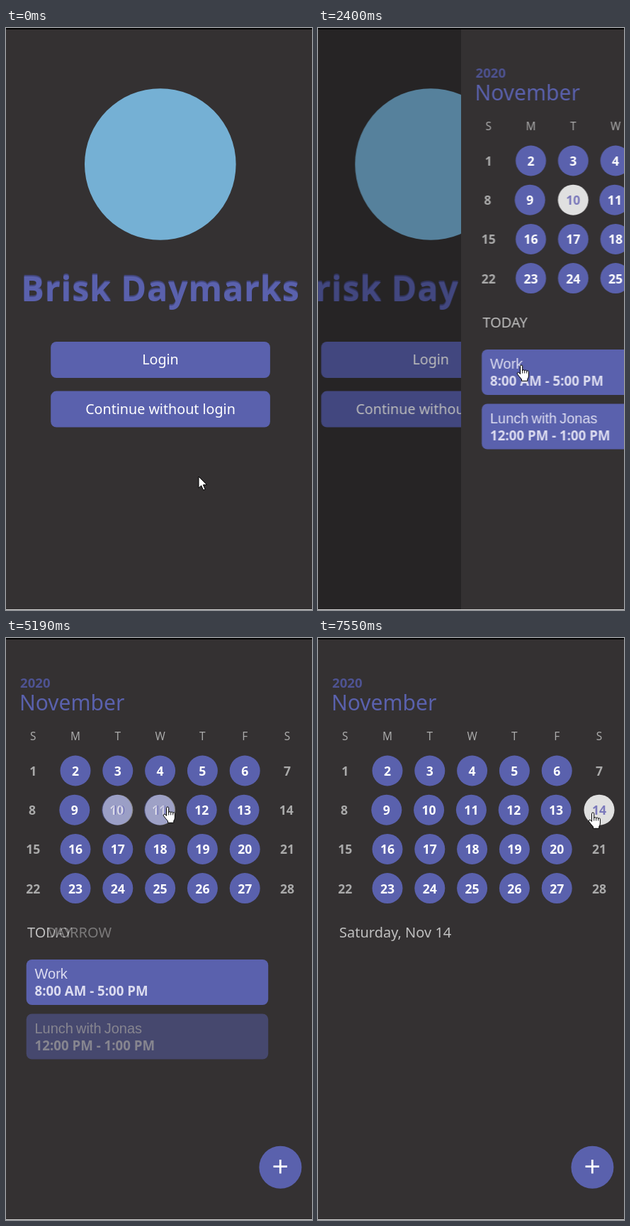
Animation of 432 by 820 pixels, one loop 8000 ms. Source, as an HTML page:

```html
<!DOCTYPE html>
<html lang="en">
<head>
<meta charset="utf-8">
<title>Calendar app</title>
<style>
  html, body { margin: 0; width: 100%; height: 100%; overflow: hidden; background: #343132; }
  svg { display: block; width: 432px; height: 820px; font-family: "Noto Sans", "Open Sans", sans-serif; }
  .bg { fill: #343132; }
  .blue { fill: #5a61ad; }
  .white { fill: #fff; }
  .grey { fill: #aaa; }
  .mid { text-anchor: middle; }
  .title { font-size: 48.5px; font-weight: 600; letter-spacing: .8px; text-shadow: 0 -2px 1px #454a85; }
  .button { font-size: 19.7px; }
  .year { font-size: 18.6px; font-weight: 700; fill: #4e5392; }
  .month { font-size: 30px; }
  .week { font-size: 15.4px; }
  .day { font-size: 17.6px; font-weight: 600; }
  .picked { fill: #7b79bb; }
  .heading { font-size: 20px; fill: #c0c0c0; }
  .event { font: 20px "Liberation Sans", Arial, sans-serif; word-spacing: -1.5px; fill: #dcdcf0; }
  .time { font-size: 18.7px; font-weight: 600; fill: #dcdcf0; }

  .anim { animation: 8s linear infinite both; }
  #login { animation-name: leave; }
  #shade { animation-name: dim; }
  #month { animation-name: enter; }
  #tomorrow { animation-name: fade1; }
  #saturday { animation-name: fade2; }
  #cursor { animation-name: move; }
  #arrow { animation-name: arrow; animation-timing-function: step-end; }
  #hand { animation-name: hand; animation-timing-function: step-end; }

  @keyframes leave {
    0%, 27.4% { transform: translateX(0); animation-timing-function: cubic-bezier(.66,.1,.66,.9); }
    31.5%, 100% { transform: translateX(-110.5px); }
  }
  @keyframes enter {
    0%, 27.4% { transform: translateX(432px); animation-timing-function: cubic-bezier(.66,.1,.66,.9); }
    31.5%, 100% { transform: translateX(0); }
  }
  @keyframes dim {
    0%, 27.4% { opacity: 0; animation-timing-function: cubic-bezier(.66,.1,.66,.9); }
    31.5%, 100% { opacity: .5; }
  }
  @keyframes fade1 {
    0%, 62.125% { opacity: 0; animation-timing-function: cubic-bezier(.8,.1,.7,.9); }
    66.125%, 100% { opacity: 1; }
  }
  @keyframes fade2 {
    0%, 90% { opacity: 0; animation-timing-function: cubic-bezier(.8,.1,.7,.9); }
    94.375%, 100% { opacity: 1; }
  }
  @keyframes move {
    0%, 12.1% { transform: translate(272px, 632px); }
    13.5% { transform: translate(250px, 604px); }
    15% { transform: translate(232px, 570px); }
    16.25% { transform: translate(232px, 540px); }
    18.75% { transform: translate(262px, 495px); }
    21.25%, 22.3% { transform: translate(283px, 476px); }
    23.125%, 44.99% { transform: translate(287px, 475px); }
    45%, 46.1% { transform: translate(282px, 471px); }
    50% { transform: translate(225px, 320px); }
    52.5% { transform: translate(199px, 250px); }
    53.75% { transform: translate(206px, 223px); }
    55% { transform: translate(226px, 236px); }
    55.375%, 78.12% { transform: translate(228px, 238px); }
    78.125%, 78.5% { transform: translate(246px, 252px); }
    80.625% { transform: translate(310px, 279px); }
    83.125% { transform: translate(370px, 266px); }
    84.75%, 100% { transform: translate(388px, 246px); }
  }
  @keyframes arrow {
    0% { opacity: 1; } 15.29% { opacity: 0; }
    17.8% { opacity: 1; } 19.01% { opacity: 0; }
    46.59% { opacity: 1; } 48.59%, 100% { opacity: 0; }
  }
  @keyframes hand {
    0% { opacity: 0; } 15.29% { opacity: 1; }
    17.8% { opacity: 0; } 19.01% { opacity: 1; }
    46.59% { opacity: 0; } 48.59%, 100% { opacity: 1; }
  }
</style>
</head>
<body>
<svg id="stage" viewBox="0 0 432 820"></svg>
<script>
  const text = (x, y, cls, s) => `<text x="${x}" y="${y}" class="${cls}">${s}</text>`;
  const box = (x, y, w, h, cls, r = 0) =>
    `<rect x="${x}" y="${y}" width="${w}" height="${h}" rx="${r}" class="${cls}"/>`;
  const disc = (x, y, r, fill) => `<circle cx="${x}" cy="${y}" r="${r}" fill="${fill}"/>`;
  const columns = [0, 1, 2, 3, 4, 5, 6];
  const columnX = i => 38.2 + 59.8 * i;

  const button = (y, label) =>
    box(63.2, y, 309.7, 51, "blue", 8) + text(218, y + 32.4, "white button mid", label);

  const card = (y, name, hours) =>
    box(28.7, y, 341.5, 64, "blue", 8) +
    text(40.5, y + 27, "event", name) + text(40.5, y + 51, "time", hours);

  // One week of days; the picked day gets a light disc.
  function week(row, picked) {
    const y = 187 + 55.2 * row;
    return columns.map(i => {
      const n = row * 7 + i + 1;
      const on = n === picked;
      const weekend = i % 6 === 0;
      const x = columnX(i) - (row === 1 && !on ? 1.2 : 0);
      const fill = on ? "#e0e0e0" : "#5a61ad";
      const cls = on ? "picked" : weekend ? "grey" : "white";
      return (on || !weekend ? disc(x, y, 21.5, fill) : "") +
        text(x, y + 7, `${cls} day mid`, n);
    }).join("");
  }

  const agenda = (id, picked, heading, cards = "") =>
    `<g id="${id}" class="anim">` + box(0, 215, 432, 385, "bg") + week(1, picked) +
    text(30, 422, "heading", heading) + cards + `</g>`;

  const work = card(453, "Work", "8:00 AM - 5:00 PM");
  const lunch = card(529.5, "Lunch with Jonas", "12:00 PM - 1:00 PM");

  const login = `<g id="login" class="anim">` +
    disc(217.8, 192, 106.8, "#75b0d4") +
    text(218, 385, "blue title mid", "Brisk Daymarks") +
    button(442, "Login") + button(511.6, "Continue without login") + `</g>`;

  const month = `<g id="month" class="anim">` + box(0, 0, 432, 820, "bg") +
    agenda("today", 10, "TODAY", work + lunch) +
    agenda("tomorrow", 11, "TOMORROW", work) +
    agenda("saturday", 14, "Saturday, Nov 14") +
    text(20, 70, "year", "2020") + text(19, 102, "blue month", "November") +
    columns.map(i => text(columnX(i), 143.7, "grey week mid", "SMTWTFS"[i])).join("") +
    week(0) + week(2) + week(3) +
    disc(387.4, 745.7, 30, "#5a61ad") +
    `<path d="M377.5 744.7h19.5M387.3 735v19.5" stroke="#fff" stroke-width="2.8"/></g>`;

  const cursor = `<g id="cursor" class="anim" fill="#fff" stroke="#000" stroke-linejoin="round">
    <path id="arrow" class="anim" d="M0 0V16.2l3.7-3.5 2.9 6.4 2.6-1.1-2.8-6.3h5.2Z"/>
    <g id="hand" class="anim">
      <path d="M-1.5 12.5V1.6a1.6 1.6 0 0 1 3.2 0V8a1.5 1.5 0 0 1 3 .3 1.5 1.5 0 0 1 3 .6 1.4 1.4 0 0 1 2.7.8V15q0 2.5-1.6 4.5V22.3H.5V20Q-3 16-5.6 12.5q-.6-2 1.2-2.3 1.5 0 2.9 2.3Z"/>
      <path d="M1.7 8v3.5M4.7 8.3v3.2M7.7 9v2.5" fill="none" stroke-width=".9"/>
    </g></g>`;

  document.getElementById("stage").innerHTML =
    box(0, 0, 432, 820, "bg") + login +
    `<rect id="shade" class="anim" width="432" height="820"/>` + month +
    `<rect width="432" height="2"/><rect y="819" width="432" height="1" fill="#d4d4d4"/>` + cursor;
</script>
</body>
</html>
```
